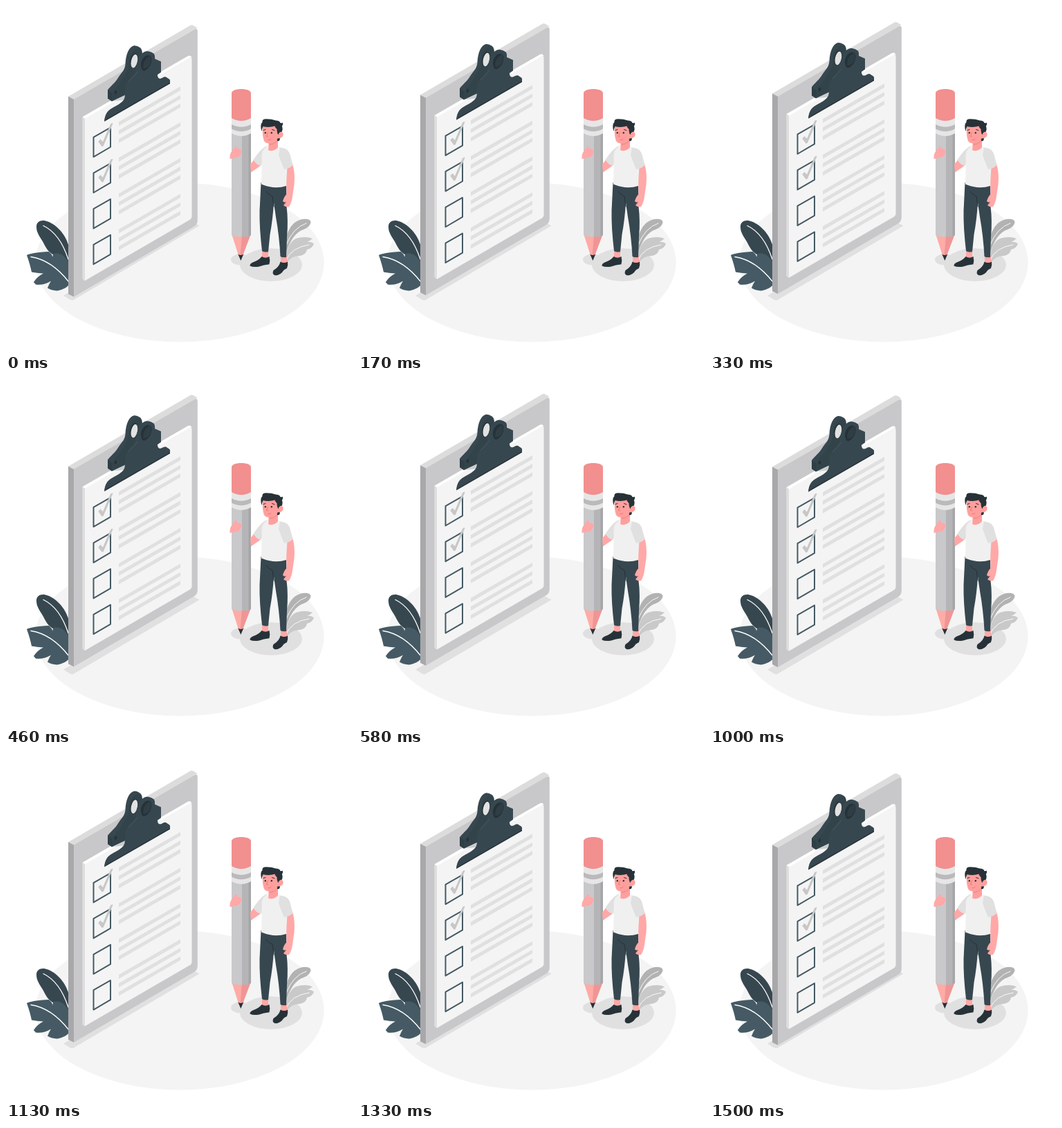
These frames come from a looping animation (500x500 px, 1540 ms). An HTML page:

```html
<!DOCTYPE html>
<html lang="en">
<head>
<meta charset="utf-8">
<title>Checklist</title>
<style>
  html, body { margin: 0; width: 100%; height: 100%; overflow: hidden; background: #fff; }
  svg { display: block; width: 100vw; height: 100vh; }
  .ink { fill: #37474f; }
  .slate { fill: #455a64; }
  .dark { fill: #263238; }
  .skin { fill: #ffa8a7; }
  .face { fill: #ff9f9d; }
  .shade { fill: #e0e0e0; }
  .line { fill: none; stroke-linecap: round; stroke-linejoin: round; }
</style>
</head>
<body>
<svg viewBox="0 0 500 500">
  <defs>
    <g id="row">
      <path class="line" stroke="#455a64" stroke-width="2" d="M126.5 190L151 176V204L126.5 218.3Z"/>
      <path id="bar" class="shade" d="M163 167.8L252 116.6V122.2L163 173.6Z"/>
      <use href="#bar" y="12.3"/>
      <use href="#bar" y="24.6"/>
    </g>
    <path id="tick" fill="#c7c7c7" d="M133.3 196.2L136.6 192.6 140 196.4 150.6 171.8Q152 169 154.6 169.8L140.8 202.6 138.6 203.4Z"/>
  </defs>

  <!-- floor and shadows -->
  <ellipse cx="251" cy="370.5" rx="208.5" ry="115" fill="#f4f4f4"/>
  <path class="shade" d="M83 418.5L268 311 279.5 317.5 98 424.5Q95 426 92 424Z"/>
  <ellipse class="shade" cx="339" cy="366.5" rx="14" ry="8"/>
  <ellipse class="shade" cx="383" cy="374" rx="45" ry="23.7"/>

  <!-- left plant -->
  <path class="ink" d="M44 319C44 312 50 309 57 310.5C72 314 86 330 90 345V372L70 360C62 357 58 350 54 342C49 333 44 328 44 319Z"/>
  <path class="slate" d="M30 360Q38 356 62 355Q66 358 67.500 363Q67 358 71 357.500Q79 357 84 362L92 371V402Q85 410 74 411.500Q65 411 60 407.500Q62 402 65 397.500Q54 404 43 402.500L40 399Q45 391 54 386.500Q45 386 37 384.500Q35 374 30 360Z"/>
  <path class="line" stroke="#fff" stroke-width="1.3" d="M54 317.500Q78 329 90 366M36 362.500Q66 367 91 399"/>

  <!-- clipboard -->
  <g id="board">
    <path fill="#dcdcdc" d="M90 131L266 28.500Q268.500 27 271 28.500L276.500 32 98 136Z"/>
    <path fill="#c8c8ca" d="M98 135.300L272 34.500Q276.800 31.800 276.800 37V310Q276.800 316 271.500 319L98 420.500Z"/>
    <path fill="#a8a8aa" d="M90 131L98 135.300V420.500L90 416.500Z"/>
    <path fill="#fff" d="M110.500 160.500L263 72.500Q266 71 268.400 74L114 164Z"/>
    <path fill="#f4f4f4" d="M114 163L265 75.500Q268.500 73.500 268.500 77V304Q268.500 307.500 265.500 309.200L114 397.200Z"/>
    <path fill="#dedede" d="M110.300 160.300L114 163V397.200Q110.300 396 110.300 393Z"/>
    <use href="#row"/>
    <use href="#row" y="51.700"/>
    <use href="#row" y="103.400"/>
    <use href="#row" y="155.100"/>
    <use href="#tick"/>
    <use href="#tick" y="51.700"/>

    <path class="ink" d="M147 134V121.500C151 116 158 111 162 104C167 96 172 93 172.500 84C173 70 178 59 185 57.500Q189 57 194 60.500Q198 64 196.500 73L212 110 153 138Z"/>
    <path class="dark" d="M147 122L153 125.500V138L147 133.500Z" opacity=".4"/>
    <path class="dark" d="M153 126Q164 114 168 106Q177 94 177.500 85C178 71 184 63 191 61.500Q196 62 196.500 68L194 91 170 136 153 138Z" opacity=".2"/>
    <ellipse cx="185" cy="79.500" rx="5.600" ry="11" transform="rotate(12 185 79.500)" class="dark"/>
    <ellipse cx="185.400" cy="80" rx="4.500" ry="10" transform="rotate(12 185.400 80)" fill="#e2e2e2"/>
    <ellipse class="dark" cx="158.500" cy="125" rx="1.700" ry="2.700" transform="rotate(15 158.500 125)"/>
    <path class="dark" d="M142 167.200Q143 158 148 154L237 108V112.500Z"/>
    <path class="ink" d="M142.300 166C143 157 146 152 153 148C161 143.500 168 140 170.500 135C173 130 171 126 172 120C173 111 178 107 182.500 101.500C188 95 188 90 189.500 83C191 73 197 65.500 205 65.500Q210 66 213.500 69Q215.500 71 215 76.500L224 80.500V96L219 99.500C219 103.500 221 106.500 225 104.500Q229 102 231 102.800L236 106Q238 108 236.500 111L155 158Q147 162 142.300 166Z"/>
    <path class="dark" d="M196 90.500C193 83 197 73.500 204 71.500Q210 70.500 210.500 77.500Q210 88.500 201 93.500Q197 94.500 196 90.500Z"/>
    <path class="ink" d="M198.500 90.500C197 83 201 75.500 208 72.500Q211 77 208.500 83.500Q205 91 198.500 90.500Z" opacity=".55"/>
    <path class="line" stroke="#455a64" stroke-width="1" d="M177 109.500Q186 101 190 95.500"/>
  </g>

  <!-- right plant -->
  <path fill="#b2b2b2" d="M403 352C403 332 410 311 429 308Q439 307 440.500 312Q440 319 430 323Q414 328 405 356Z"/>
  <path fill="#c9c9c9" d="M404 365Q407 342 419 336Q432 332 443 336Q440 339 435 341Q441 340 445 343.500Q443 350 435 352Q434 359 425 361Q412 361 406 371Z"/>
  <path class="line" stroke="#fff" stroke-width=".9" d="M405 345Q415 320 434 314M405 367Q412 349 438 345"/>

  <!-- pencil -->
  <path fill="#ffaba6" d="M326 329H354L341.500 362H336.500Z"/>
  <path fill="#f09595" d="M341 329H354L341.500 362H338.500Z"/>
  <path class="dark" d="M335.300 358.500Q339.500 361.500 343.300 358.500L339.300 368Z"/>
  <path fill="#c9c9cb" d="M326 180H342V333Q334 335 326 331Z"/>
  <path fill="#b5b5b7" d="M341 180H354V331Q348 335 341 333Z"/>
  <path fill="#a6a6a8" d="M350.500 180H354V331L350.500 333Z"/>
  <path fill="#e6e6e6" d="M326 160H354V184Q340 192 326 184Z"/>
  <path fill="#bababa" d="M326 171Q340 178.500 354 171V177.500Q340 185 326 177.500Z"/>
  <path fill="#f28f8f" d="M326 126C326 118 354 118 354 126V162Q340 170 326 162Z"/>

  <!-- person -->
  <path class="skin" d="M370 353H379V366Q374 369 370 365ZM397 360H406V373Q401 376 397 372Z"/>
  <path class="dark" d="M369.500 362Q375 365.500 380.500 362Q382 368 380.500 373.300Q372 374 366 376.500Q357 378 352.500 375.500Q352 372 359 369.500Q366 367 369.500 362Z"/>
  <path class="dark" d="M396.500 369.500Q402 372.500 407 369.500Q408 374 406 379Q401 381 399 385Q394 390 388 389Q384 387 386.500 382Q395 377 396.500 369.500Z"/>
  <path class="ink" d="M368.500 255L405 259Q405.500 275 405.500 290Q408 311 406 333L405 363Q400 364 396.500 362Q395 333 390 305L387 284Q385.500 309 381.500 330L379 355Q374 356.500 370 354Q366 320 366.500 296Z"/>
  <path class="line" stroke="#263238" stroke-width="1" d="M387 290L385 275Q379 273 376 268"/>
  <path class="skin" d="M360 220L369 230 354 240.500 353 229Z"/>
  <path class="shade" d="M377 202Q369 205 357.500 222Q361 229 368 231L376 222Z"/>
  <path class="skin" d="M402 230L414 228Q418 241 416.500 258L414 275Q413 284 409 290Q404 291 401 288L405 283Q402 285 400 282Q402 275 405.500 272Q406 256 403 244Z"/>
  <path fill="#f0f0f0" d="M379 201.500L396 204Q407 207 408 216Q406 234 405 260Q388 265.500 369 257.500Q370 236 369.500 216Q370 207 379 201.500Z"/>
  <path class="shade" d="M396 204.500Q407 205 410 213L414.500 230Q410 235 402 236Q396 222 394 215Z"/>
  <path class="face" d="M379 194L393 190V204Q388 211 379 208.500Q380 203 379 194Z"/>
  <path fill="#f28f8f" d="M381 198L392 194Q389 201 381 201Z"/>
  <path class="dark" d="M388 178H398L395.500 193.500Q394.500 196 392 195Z"/>
  <path class="face" d="M371 174Q381 170 392 174L393.500 184Q396 180.500 399.500 182.500Q402 186 399 189.500Q396 192 392.800 191Q391 196 386 198Q376 200 373 195Q370 187 371 174Z"/>
  <path class="dark" d="M369.500 181C368 176 367.500 170 370.500 168Q369.500 163.500 376 163.300Q384 163.300 390 165.500Q395.500 165.500 396.500 169Q398.500 169.500 400 168.500Q400.500 172 398.800 173.500Q400.500 178 398.500 182Q395.500 181 393.500 186Q391.500 184 391.500 178Q389 176 388.500 173.500Q380 176 371.500 174Q370 177 369.500 181Z"/>
  <path class="line" stroke="#263238" stroke-width="1" d="M372 179.500L375 178.500M384.500 178.500L388 179.800"/>
  <circle class="dark" cx="374.800" cy="183.300" r="1.200"/>
  <circle class="dark" cx="383.800" cy="183.300" r="1.200"/>
  <path class="line" stroke="#e47777" stroke-width=".9" d="M378.500 183L376.500 188.500 378.500 189M379 193.500Q381 194.500 383 192.500"/>
  <path class="skin" d="M323.500 221Q323 213 327 209Q330 206 331.500 202.500Q334 202 334 206L338 207Q341 209 340 212Q339 217 334 219Q328 220 323.500 221Z"/>
</svg>
<script>
  const LOOP = 1540, PEAK = 705, RISE = 10, REST = 0.6;
  const board = document.getElementById('board');

  // The board floats up and down at constant speed.
  function draw(now) {
    const gap = Math.abs(now % LOOP - PEAK);
    const lift = RISE * (1 - Math.min(gap, LOOP - gap) / (LOOP / 2));
    board.setAttribute('transform', `translate(0 ${(REST - lift).toFixed(2)})`);
  }

  const start = performance.now();
  (function tick() {
    draw(performance.now() - start);
    requestAnimationFrame(tick);
  })();
</script>
</body>
</html>
```
